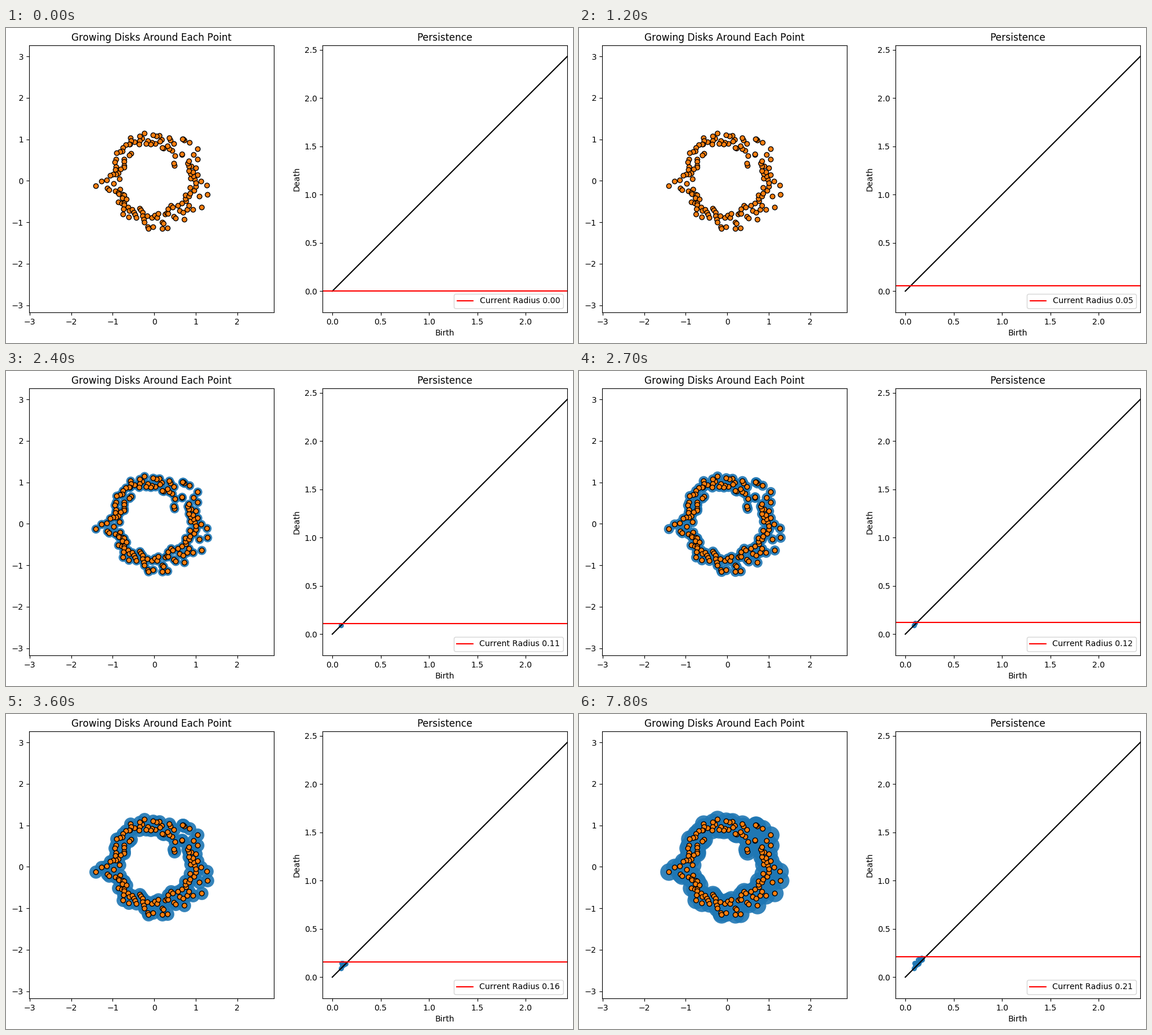
Recreate the animation shown at these times as a matplotlib script. Size 980 px wide and 545 px high, loop 8000 ms.

```python
import numpy as np
import matplotlib.pyplot as plt
from matplotlib.animation import FuncAnimation

W, H, DPI = 980, 545, 100
LOOP, INTERVAL = 8000, 100
UNIT = 71.75  # pixels per data unit in the left panel
plt.rcParams.update({"font.family": "DejaVu Sans", "text.kerning_factor": 6})


def noisy_ring(count, rng):
    """Scatter points between an inner and an outer edge given every 30 degrees."""
    inner = [0.75, 0.60, 0.62, 0.85, 0.90, 0.74, 0.84, 0.76, 0.70, 0.77, 0.68, 0.68]
    outer = [1.36, 1.36, 1.42, 1.20, 1.26, 1.14, 1.48, 1.24, 1.14, 1.18, 1.26, 1.40]
    angle = (np.arange(count) + rng.random(count)) * 360 / count
    nodes = np.arange(0, 360, 30)
    low = np.interp(angle, nodes, inner, period=360)
    high = np.interp(angle, nodes, outer, period=360)
    radius = low + (high - low) * rng.beta(1.2, 1.6, count)
    turn = np.radians(angle)
    return radius * np.cos(turn), radius * np.sin(turn)


def short_loops(count, rng):
    """Births rise evenly and each death follows shortly after."""
    birth = np.linspace(0.09, 0.176, count)
    lag = 0.004 + 0.05 * rng.random(count) ** 2
    lag[0] = 0.004
    return np.column_stack([birth, np.minimum(birth + lag, 0.198)])


def add_panel(left, title, xlim, ylim):
    ax = fig.add_axes([left / W, 53 / H, 422.73 / W, 462 / H])
    ax.set(title=title, xlim=xlim, ylim=ylim)
    return ax


def radius_at(ms):
    """Stepwise growth with a long pause after the twelfth step."""
    step = min(ms // 300, 12) if ms < 7200 else 13 + (ms - 7200) // 300
    return np.interp(step, [0, 8, 12, 15], [0, 0.1096, 0.159, 0.211])


rng = np.random.default_rng(4)
x, y = noisy_ring(148, rng)
pairs = short_loops(14, rng)

fig = plt.figure(figsize=(W / DPI, H / DPI), dpi=DPI, facecolor="white")

cloud = add_panel(40, "Growing Disks Around Each Point",
                  (-3.0132, 2.8784), (-3.1735, 3.2655))
cloud.set(xticks=range(-3, 3), yticks=range(-3, 4))
disks = cloud.scatter(x, y, s=0, c="C0", alpha=0.9, linewidths=0)
cloud.scatter(x, y, s=36, c="C1", edgecolors="k", linewidths=1)

diagram = add_panel(547.27, "Persistence", (-0.1, 2.43), (-0.2196, 2.5453))
diagram.set(xlabel="Birth", ylabel="Death",
            xticks=np.arange(0, 2.1, 0.5), yticks=np.arange(0, 2.6, 0.5))
loops = diagram.scatter([], [], s=30, c="C0", alpha=0.9)
diagram.plot([0, 2.5], [0, 2.5], c="k")
level = diagram.axhline(0, c="r", label="Current Radius 0.00")
label = diagram.legend(loc="lower right").get_texts()[0]


def draw(frame):
    r = radius_at(frame * INTERVAL)
    disks.set_sizes([(2 * r * UNIT * 72 / DPI) ** 2])
    loops.set_offsets(pairs[pairs[:, 1] <= r])
    level.set_ydata([r, r])
    label.set_text(f"Current Radius {r:.2f}")
    return disks, loops, level, label


anim = FuncAnimation(fig, draw, frames=LOOP // INTERVAL, interval=INTERVAL,
                     repeat=True, repeat_delay=0)
plt.show()
```
